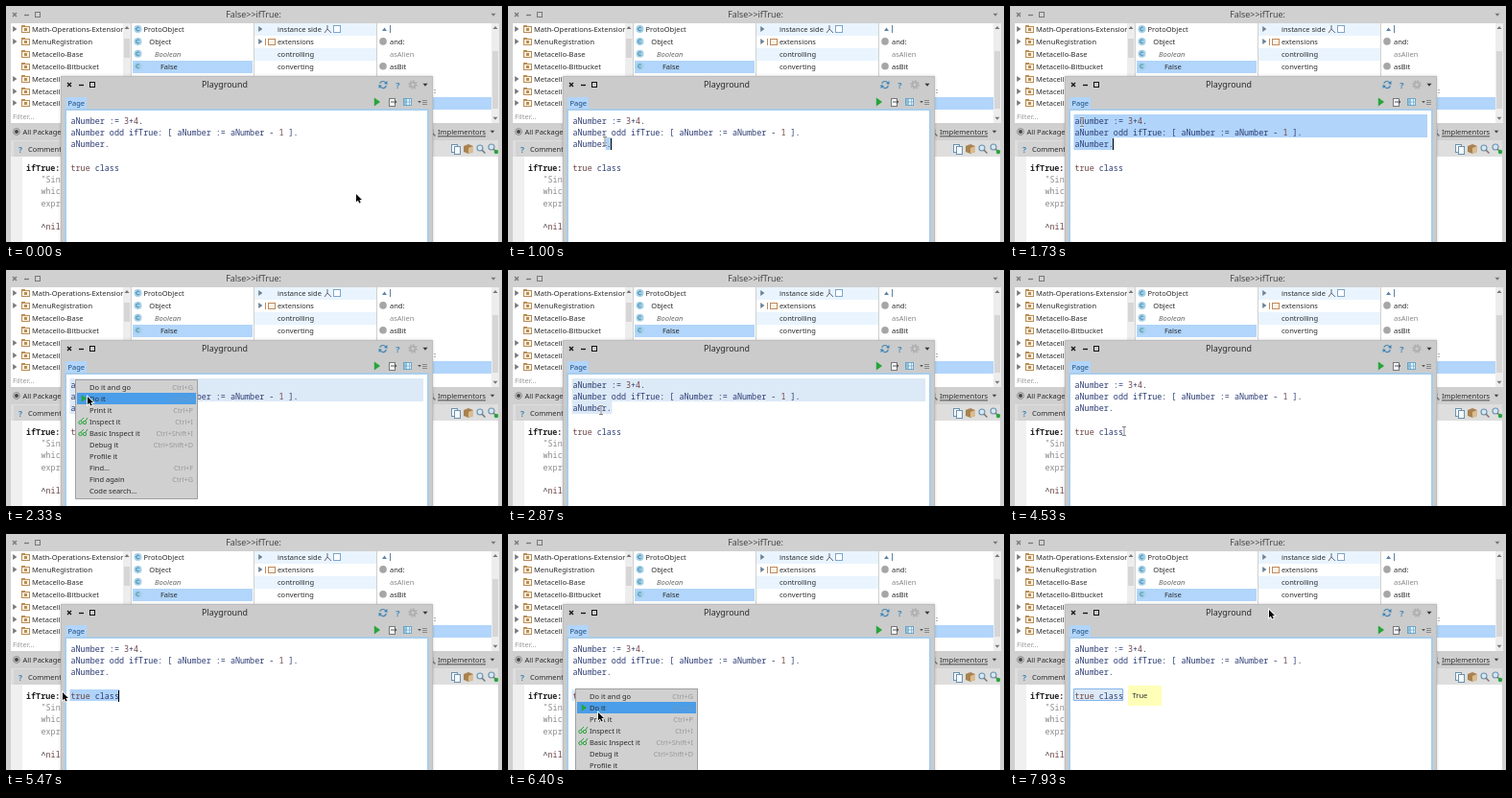
Animation, 517 px wide and 246 px high, one loop 8 s. Source, as an HTML page with a canvas:

```html
<!DOCTYPE html>
<html lang="en">
<head>
<meta charset="utf-8">
<title>Playground</title>
<style>
html, body { margin: 0; width: 100%; height: 100%; overflow: hidden; }
canvas { display: block; }
</style>
</head>
<body>
<canvas id="stage" width="517" height="246"></canvas>
<script>
const ctx = document.getElementById('stage').getContext('2d');
const LOOP = 8000, TICK = 1000 / 15;
const SANS = '"Noto Sans", "Open Sans", sans-serif';
const MONO = '"Noto Sans Mono", "DejaVu Sans Mono", monospace';
const LEFT = 67.5, RIGHT = 435, TOP = 112.6, PITCH = 12.3;
const BLUE = '#4488b8', GREEN = '#27a53a', INK = '#2a2a2a', ROW = '#b1d5fb';
const NAVY = '#2c3c74', BROWN = '#6e4444';
const CODE = ['aNumber := 3+4.', 'aNumber odd ifTrue: [ aNumber := aNumber - 1 ].', 'aNumber.', '', 'true class'];
const MENU = [
  ['Do it and go', 'Ctrl+G'], ['Do it', 'Ctrl+D'], ['Print it', 'Ctrl+P'], ['Inspect it', 'Ctrl+I'],
  ['Basic Inspect it', 'Ctrl+Shift+I'], ['Debug it', 'Ctrl+Shift+D'], ['Profile it', ''],
  ['Find...', 'Ctrl+F'], ['Find again', 'Ctrl+G'], ['Code search...', '']
];
// Pointer path: time, x, y
const PATH = [
  [0, 365, 196], [650, 110, 146], [860, 110, 146], [1390, 58, 118], [1730, 75, 121],
  [2040, 75, 121], [2670, 97, 146], [2870, 97, 146], [3330, 122, 153], [4000, 122, 153],
  [4600, 119, 169], [4860, 119, 169], [5270, 57, 166], [5400, 59, 165], [5470, 59, 165],
  [5930, 72, 168], [6030, 73, 168], [6270, 94, 185], [6400, 94, 186], [6730, 98, 191],
  [7060, 98, 191], [7400, 129, 170], [7730, 129, 170], [7930, 270, 79], [8000, 270, 79]
];

function rect(x, y, w, h, color) {
  ctx.fillStyle = color;
  ctx.fillRect(x, y, w, h);
}
function frame(x, y, w, h, color) {
  ctx.strokeStyle = color;
  ctx.lineWidth = 1;
  ctx.strokeRect(x + .5, y + .5, w - 1, h - 1);
}
function text(s, x, y, color = INK, size = 7.5, style = '', family = SANS, align = 'left') {
  ctx.font = `${style} ${size}px ${family}`;
  ctx.fillStyle = color;
  ctx.textAlign = align;
  ctx.fillText(s, x, y);
}
function code(s, x, y, color = NAVY, style = '') {
  text(s, x, y, color, 8.42, style, MONO);
  return ctx.measureText(s).width;
}
function poly(points, fill, stroke, width = 1) {
  ctx.beginPath();
  points.forEach(([x, y]) => ctx.lineTo(x, y));
  ctx.closePath();
  if (stroke) {
    ctx.strokeStyle = stroke;
    ctx.lineWidth = width;
    ctx.stroke();
  }
  if (fill) {
    ctx.fillStyle = fill;
    ctx.fill();
  }
}
function line(points, color, width = 1) {
  ctx.beginPath();
  points.forEach(([x, y], i) => i % 2 ? ctx.lineTo(x, y) : ctx.moveTo(x, y));
  ctx.strokeStyle = color;
  ctx.lineWidth = width;
  ctx.stroke();
}
function arc(x, y, r, color, width = 1, from = 0, to = 7) {
  ctx.beginPath();
  ctx.arc(x, y, r, from, to);
  ctx.strokeStyle = color;
  ctx.lineWidth = width;
  ctx.stroke();
}
function dot(x, y, r, color) {
  ctx.beginPath();
  ctx.arc(x, y, r, 0, 7);
  ctx.fillStyle = color;
  ctx.fill();
}
const right = (x, y, r, color) => poly([[x - r * .6, y - r], [x + r * .8, y], [x - r * .6, y + r]], color);
const down = (x, y, r, color) => poly([[x - r, y - r * .5], [x + r, y - r * .5], [x, y + r * .7]], color);

function windowButtons(x, y, color) {
  line([[x - 2, y - 2], [x + 2, y + 2], [x + 2, y - 2], [x - 2, y + 2]], color, 1.3);
  line([[x + 10, y + .5], [x + 15, y + .5]], color, 1.3);
  frame(x + 21, y - 3, 6, 6, color);
}
function magnifier(x, y) {
  dot(x - 1, y - 1, 3, '#d4e6f2');
  arc(x - 1, y - 1, 3, '#6d92ac', 1.1);
  line([[x + 1, y + 1], [x + 4.5, y + 4.5]], '#777', 1.5);
}
function sheet(x, y, color) {
  rect(x - 3, y - 4, 7, 9, '#f4f9fd');
  frame(x - 3, y - 4, 7, 9, color);
}
function scrollbar(x, w, thumbTop, thumbHeight) {
  rect(x, 18, w, 104, '#ededed');
  rect(x + 1, thumbTop, w - 2, thumbHeight, '#d6d6d6');
  const mid = x + w / 2;
  poly([[mid - 2.5, 24], [mid, 21], [mid + 2.5, 24]], '#777');
  down(mid, 117, 2.5, '#777');
}

function drawBrowser() {
  rect(0, 0, 517, 246, '#d0d0d0');
  windowButtons(9, 9, '#777');
  text('False>>ifTrue:', 258, 12, '#444', 8.9, '', SANS, 'center');
  down(508, 9, 2.5, '#777');
  [[5, 125], [131, 127], [259, 127], [387, 119]].forEach(([x, w]) => rect(x, 18, w, 104, '#fff'));

  const rowY = i => 24 + i * 12.9;
  ['Math-Operations-Extension', 'MenuRegistration', 'Metacello-Base', 'Metacello-Bitbucket',
    'Metacello-Core', 'Metacello-FileTree', 'Metacello-GitHub'].forEach((name, i) => {
    const y = Math.round(rowY(i));
    if (i < 2 || i > 3) right(9, y, 3, '#777');
    rect(16, y - 4, 4, 2, '#b98d55');
    rect(16, y - 3, 9, 7, '#fbf3e4');
    frame(16, y - 3, 9, 7, '#b98d55');
    rect(19, y - 1, 3, 3, '#b98d55');
    text(name, 27, y + 2.8);
  });
  scrollbar(122, 8, 34, 20);
  text('Filter...', 7, 117.5, '#999');

  rect(132, 57, 125, 13, ROW);
  ['ProtoObject', 'Object', 'Boolean', 'False'].forEach((name, i) => {
    const y = rowY(i);
    dot(137.5, y, 4, '#a3cfe6');
    arc(137.5, y, 1.8, '#3b83a8', 1, .8, 5.5);
    text(name, 143.5 + i * 5.8, y + 2.8, i === 2 ? '#666' : INK, 7.5, i === 2 ? 'italic' : '');
  });

  rect(259, 18, 127, 13, '#e9f4fe');
  rect(259, 44, 127, 13, '#e9f4fe');
  ['instance side', 'extensions', 'controlling', 'converting'].forEach((name, i) => {
    if (i < 2) right(265, rowY(i), 3, '#6d8296');
    text(name, 283, rowY(i) + 2.8);
  });
  rect(273, 34, 8, 7, '#fbf3e4');
  frame(273, 34, 8, 7, '#c08a5a');
  rect(270, 34, 1, 7, '#c08a5a');
  line([[335, 20], [335, 24], [335, 24], [332, 28], [335, 24], [339, 28]], '#667');
  rect(341, 20, 8, 8, '#fff');
  frame(341, 20, 8, 8, '#7aa6cf');

  poly([[392, 26], [394.5, 22.5], [397, 26]], '#5b83a8');
  line([[400.5, 20], [400.5, 28]], '#5b83a8');
  dot(393, rowY(1), 3.8, '#a6a6a6');
  dot(393, rowY(3), 3.8, '#a6a6a6');
  text('and:', 400, rowY(1) + 2.8);
  text('asAlien', 400, rowY(2) + 2.8, '#888');
  text('asBit', 400, rowY(3) + 2.8);
  text(':', 446, rowY(5) + 2.8);
  rect(388, 95, 118, 13, ROW);
  scrollbar(506, 8, 47, 60);

  arc(11, 131, 3.4, '#888');
  dot(11, 131, 2, '#444');
  text('All Packages', 17.5, 134);
  magnifier(443, 131);
  text('Implementors', 450, 134);
  rect(450, 135.5, 50, .8, INK);
  down(507, 131, 2.3, '#444');

  rect(5, 140, 508, 17, '#dedede');
  rect(8, 141, 60, 16, '#d3d3d3');
  text('?', 13, 152.5, BLUE, 8.5, 'bold');
  text('Comment', 23, 152);
  sheet(467, 148, '#6d92ac');
  sheet(470, 150, '#6d92ac');
  poly([[482, 144], [487, 146], [487, 152], [482, 154], [477, 152], [477, 146]], '#a98250');
  poly([[482, 148], [487, 146], [487, 152], [482, 154]], '#d9bd90');
  magnifier(495, 149);
  magnifier(507, 148);
  dot(511, 152, 2.2, GREEN);

  rect(5, 157, 508, 89, '#fff');
  rect(5, 157, 12, 89, '#f0f0f0');
  code('ifTrue:', 21, 171.5, '#222', 'bold');
  ['"Sin', 'whic', 'expr'].forEach((s, i) => code(s, 36.5, 184 + i * 12.3, '#8c8c8c'));
  code('nil', 36.5 + code('^', 36.5, 233, INK), 233, BROWN);
}

function drawPlayground() {
  ctx.shadowColor = 'rgba(0,0,0,.2)';
  ctx.shadowBlur = 3;
  rect(57, 73, 388, 180, '#cbcbcb');
  ctx.shadowBlur = 0;
  frame(57, 73, 388, 180, '#bdbdbd');
  windowButtons(66, 82, '#111');
  text('Playground', 228, 85.3, INK, 8.9, '', SANS, 'center');
  arc(393, 82, 3.5, BLUE, 1.2, .3, 2.7);
  arc(393, 82, 3.5, BLUE, 1.2, 3.5, 5.8);
  poly([[397.5, 78], [397.5, 82], [394, 81]], BLUE);
  poly([[388.5, 86], [388.5, 82], [392, 83]], BLUE);
  text('?', 408.5, 85.5, BLUE, 9, 'bold', SANS, 'center');
  ctx.setLineDash([1.7, 1.4]);
  arc(424, 82, 4, '#adadad', 1.5);
  ctx.setLineDash([]);
  arc(424, 82, 2.5, '#adadad', 1.5);
  down(437, 82, 2.5, '#333');

  rect(62, 95, 22, 12, ROW);
  text('Page', 64.5, 103.7, '#1c4a78');
  right(386.5, 100, 4.5, GREEN);
  sheet(402, 100, '#777');
  line([[401, 100], [407, 100], [405, 98], [407, 100], [405, 102], [407, 100]], '#555');
  rect(414, 96, 9, 8, '#e8f3fa');
  rect(414, 96, 3, 8, '#8fc3e0');
  frame(414, 96, 9, 8, '#6ba6c8');
  line([[417.5, 96], [417.5, 104], [420.5, 96], [420.5, 104], [414, 100], [423, 100]], '#6ba6c8', .7);
  down(431, 100, 1.8, '#555');
  line([[434, 98.5], [439, 98.5], [434, 100.5], [439, 100.5], [434, 102.5], [439, 102.5]], '#777', .8);
  rect(61, 107, 380, 142, '#a9cdea');
  rect(63, 109, 376, 140, '#fff');
}

function drawCode() {
  CODE.forEach((source, i) => {
    let x = LEFT;
    for (const part of source.split(/(\d|true)/)) {
      x += code(part, x, 122.8 + i * PITCH, /\d|true/.test(part) ? BROWN : NAVY);
    }
  });
}

const lineTop = i => Math.round(TOP + i * PITCH);
function select(first, startX, last, endX, fill, outline) {
  const a = lineTop(first), a2 = lineTop(first + 1), b = lineTop(last), b2 = lineTop(last + 1);
  const shape = first === last
    ? [[startX, a], [endX, a], [endX, b2], [startX, b2]]
    : [[startX, a], [RIGHT, a], [RIGHT, b], [endX, b], [endX, b2], [LEFT - 1, b2], [LEFT - 1, a2], [startX, a2]];
  poly(shape, fill);
  if (outline) poly(shape.map(([x, y]) => [Math.round(x) - .5, y - .5]), null, '#85b6ea');
}

function drawSelection(t, mouse, charWidth) {
  const upper = t < 4660;
  const last = upper ? 2 : 4;
  const endX = LEFT + CODE[last].length * charWidth;
  const clicked = upper ? 650 : 4660, dragged = upper ? 1720 : 5390;
  const menuAt = upper ? 2060 : 6060, printed = upper ? 2925 : 6925;
  if (t < clicked || (upper && t > 4525)) return;

  let first = upper ? 0 : 4, startX = LEFT - 1;
  if (t < dragged) {
    if (upper) first = Math.max(0, Math.min(2, Math.floor((mouse.y - TOP) / PITCH)));
    const column = Math.max(0, Math.round((mouse.x - LEFT) / charWidth));
    startX = LEFT - 1 + Math.min(column, CODE[first].length) * charWidth;
  }
  const focused = t < menuAt;
  select(first, startX, last, endX + .5, focused ? '#b0d4fa' : '#dce9f6', t >= printed);
  if (focused) rect(Math.floor(endX), lineTop(last) + 1, 1, 12, '#000');
}

function drawPopup(s, x, y) {
  rect(x, y, 35, 21, '#ffffb8');
  text(s, x + 4.5, y + 12.8);
}

function drawMenu(x, y, mouse) {
  const hovered = Math.floor((mouse.y - y - 2) / 12);
  const height = MENU.length * 12 + 5;
  rect(x, y, 128, height, '#d0d0d0');
  frame(x, y, 128, height, '#a0a0a0');
  MENU.forEach(([label, keys], i) => {
    const rowTop = y + 2 + i * 12, mid = rowTop + 6;
    if (i === hovered) rect(x + 2, rowTop, 124, 12, '#4a9de8');
    if (i === 1) right(x + 9, mid, 3.8, GREEN);
    if (i === 3 || i === 4) {
      arc(x + 5.5, mid + 1, 1.7, GREEN);
      arc(x + 10, mid + 1, 1.7, GREEN);
      line([[x + 6, mid - 1], [x + 9, mid - 4], [x + 11, mid - 1], [x + 13, mid - 4]], GREEN);
    }
    text(label, x + 15, mid + 2.8);
    text(keys, x + 123, mid + 2.8, i === hovered ? '#6f9cc8' : '#989898', 7.3, '', SANS, 'right');
  });
}

function drawPointer({ x, y }, menuOpen) {
  const overText = !menuOpen && x > 64 && x < 438 && y > 110 && y < 177;
  if (overText) {
    const beam = [[x, y - 4.5], [x, y + 4.5], [x - 2, y - 4.5], [x + 2, y - 4.5], [x - 2, y + 4.5], [x + 2, y + 4.5]];
    line(beam, 'rgba(255,255,255,.8)', 2.2);
    line(beam, '#777', .9);
  } else {
    const arrow = [[0, 0], [0, 8.2], [1.9, 6.5], [3.2, 9.4], [4.7, 8.8], [3.4, 6], [6, 5.9]];
    poly(arrow.map(([dx, dy]) => [x + dx, y + dy]), '#000', '#fff', 1.6);
  }
}

function pointerAt(t) {
  const i = Math.max(1, PATH.findIndex(p => p[0] >= t));
  const [t0, x0, y0] = PATH[i - 1], [t1, x1, y1] = PATH[i];
  const k = (t - t0) / (t1 - t0), ease = k * k * (3 - 2 * k);
  return { x: Math.round(x0 + (x1 - x0) * ease), y: Math.round(y0 + (y1 - y0) * ease) };
}

function draw(t) {
  const mouse = pointerAt(t);
  const between = (a, b) => t >= a && t < b;
  const firstMenu = between(2060, 2860), secondMenu = between(6060, 6860);
  drawBrowser();
  drawPlayground();
  ctx.font = `8.42px ${MONO}`;
  drawSelection(t, mouse, ctx.measureText('a').width);
  drawCode();
  if (between(2925, 4525)) drawPopup('6', 112, 134);
  if (t >= 6925) drawPopup('True', 123, 158);
  if (firstMenu) drawMenu(72, 114, mouse);
  if (secondMenu) drawMenu(70, 161, mouse);
  drawPointer(mouse, firstMenu || secondMenu);
}

function loop() {
  const t = performance.now() % LOOP;
  draw(Math.min(Math.floor((t + 4) / TICK) * TICK, LOOP - 1));
  requestAnimationFrame(loop);
}
loop();
</script>
</body>
</html>
```
